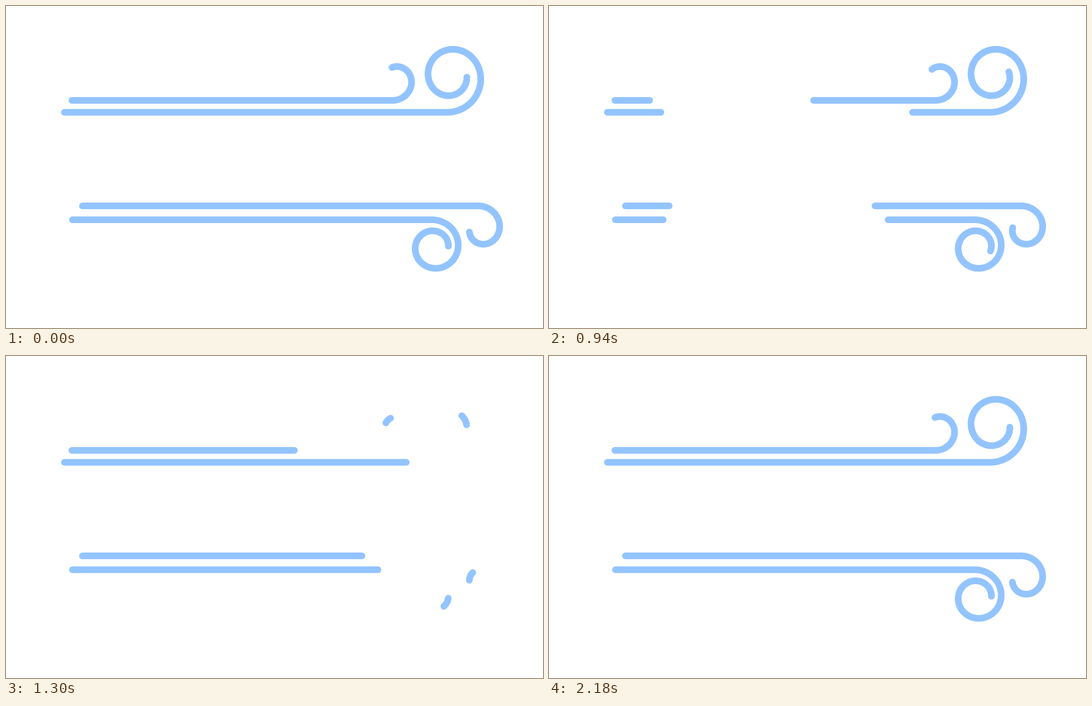
Animation of 966x580 px, one loop 3.58 s. Source, as an HTML page with a canvas:

```html
<!DOCTYPE html>
<html lang="en">
<head>
<meta charset="utf-8">
<title>Wind</title>
<style>
  html, body { margin: 0; width: 100%; height: 100%; overflow: hidden; background: #fff; }
  canvas { display: block; }
</style>
</head>
<body>
<canvas id="stage" width="966" height="580"></canvas>
<script>
const ctx = document.getElementById('stage').getContext('2d');
const LOOP = 3580, START = 500, DONE = 2180, STEP = 40;
const QUARTER = Math.PI / 2;

// Each gust is a line from (x, y) that curls into a logarithmic spiral.
// right: rightmost x, height: first half turn, shrink: radius ratio per quarter,
// aspect: width to height, rest: quarter turns shown at rest, side: -1 curls up, 1 down
const gusts = [
  { x: 118.5, y: 170, right: 729.5, height: 61, shrink: 0.808, aspect: 0.99, rest: 2.25, side: -1 },
  { x: 105, y: 191.5, right: 854, height: 113.5, shrink: 0.858, aspect: 0.974, rest: 5.04, side: -1 },
  { x: 137.5, y: 360, right: 888, height: 69, shrink: 0.803, aspect: 0.984, rest: 2.94, side: 1 },
  { x: 119.5, y: 385, right: 813.5, height: 87.5, shrink: 0.879, aspect: 1.007, rest: 5.02, side: 1 }
].map(build);

function build({ x, y, right, height, shrink, aspect, rest, side }) {
  const k = -Math.log(shrink) / QUARTER;
  const radius = height / (1 + shrink ** 2); // spiral scale, already divided by 1 + k²
  const spiral = a => {
    const fade = radius * Math.exp(-k * a);
    return [
      aspect * (fade * (Math.sin(a) - k * Math.cos(a)) - radius * shrink) + right,
      y + side * (radius - fade * (Math.cos(a) + k * Math.sin(a)))
    ];
  };
  const path = new Path2D();
  path.moveTo(x, y);
  let [px, py] = spiral(0);
  path.lineTo(px, py);
  let length = px - x, unit = 0;
  const steps = 400, end = rest + 5;
  for (let i = 1; i <= steps; i++) {
    const turn = end * i / steps;
    const [nx, ny] = spiral(turn * QUARTER);
    length += Math.hypot(nx - px, ny - py);
    if (turn <= rest) unit = length;
    path.lineTo(nx, ny);
    [px, py] = [nx, ny];
  }
  return { path, unit };
}

const clamp = v => Math.min(1, Math.max(0, v));
const smooth = p => p * p * (3 - 2 * p);
const ramp = (t, from, to) => smooth(clamp((t - from) / (to - from)));

// cubic-bezier(c, 0, c, 1)
function bezier(p, c) {
  let low = 0, high = 1;
  for (let i = 0; i < 30; i++) {
    const s = (low + high) / 2;
    if (3 * c * s * (1 - s) + s ** 3 < p) low = s; else high = s;
  }
  return smooth(low);
}

// Positions along a gust, as fractions of its resting length.
const oldTail = t => 1.049 * ramp(t, 460, 1420) + 0.06 * ramp(t, 1580, 1860);
const oldHead = t => 1 + 0.0105 * ramp(t, 460, 1060) + 0.0915 * ramp(t, 1220, 1580);
const newHead = t => bezier(clamp((t - 740) / (DONE - 740)), 0.29);

function stroke({ path, unit }, from, to) {
  if (to - from < 1e-6) return;
  ctx.setLineDash([(to - from) * unit, 9999]);
  ctx.lineDashOffset = -from * unit;
  ctx.stroke(path);
}

function draw(time) {
  const t = time < START ? time : time - (time - START) % STEP;
  const moving = t >= START && t < DONE;
  ctx.fillStyle = '#fff';
  ctx.fillRect(0, 0, 966, 580);
  ctx.strokeStyle = '#93c4ff';
  ctx.lineWidth = 12;
  ctx.lineCap = ctx.lineJoin = 'round';
  for (const gust of gusts) {
    if (moving) {
      stroke(gust, oldTail(t), oldHead(t));
      stroke(gust, 0, newHead(t));
    } else {
      stroke(gust, 0, 1);
    }
  }
}

const begin = performance.now();
function tick() {
  draw((performance.now() - begin) % LOOP);
  requestAnimationFrame(tick);
}
tick();
</script>
</body>
</html>
```
